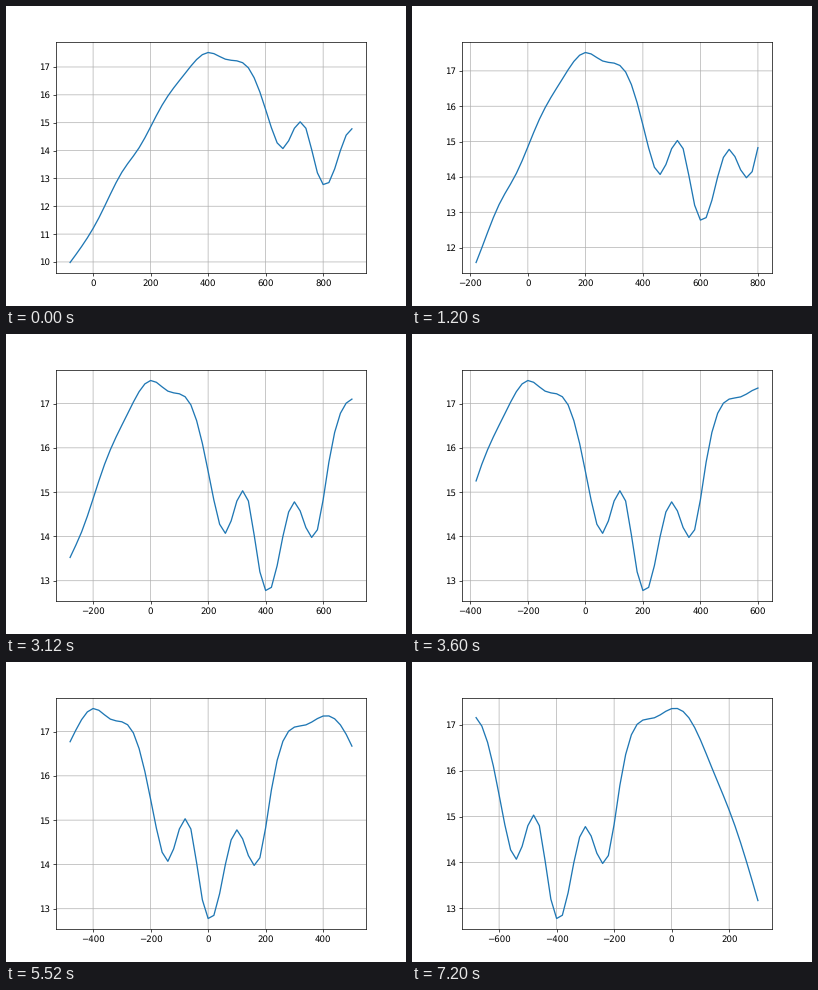
Write a matplotlib script that moves like this. It is 400 px wide and 300 px high and loops after 8 s.

```python
import matplotlib.pyplot as plt
import numpy as np
from matplotlib.animation import FuncAnimation

STEP = 20        # spacing of samples along x
WINDOW = 50      # samples visible at once
ADVANCE = 100    # distance the window moves along the curve per jump
SHIFT = 200      # distance the curve moves left per jump
INTERVAL = 400   # ms
HOLD = 3         # ticks each view stays
TICKS = 20

# Key points of the curve, joined by a smooth spline.
KNOTS = np.array([
    (-80, 9.98), (20, 11.58), (100, 13.22), (160, 14.1), (240, 15.63),
    (320, 16.77), (400, 17.52), (460, 17.28), (500, 17.22), (540, 16.97),
    (580, 16.1), (620, 14.82), (660, 14.07), (700, 14.8), (740, 14.8),
    (780, 13.2), (820, 12.85), (860, 14.0), (900, 14.78), (940, 14.2),
    (980, 14.15), (1020, 15.68), (1060, 16.78), (1100, 17.1), (1140, 17.15),
    (1200, 17.35), (1260, 17.15), (1340, 16.06), (1420, 14.8), (1500, 13.17),
])


def spline(x, y, at):
    """Natural cubic spline through the points (x, y)."""
    h = np.diff(x)
    slope = np.diff(y) / h
    system = (np.diag(np.r_[1, 2 * (h[:-1] + h[1:]), 1])
              + np.diag(np.r_[h[:-1], 0], -1)
              + np.diag(np.r_[0, h[1:]], 1))
    bend = np.linalg.solve(system, np.r_[0, 6 * np.diff(slope), 0])
    i = np.clip(np.searchsorted(x, at, side="right") - 1, 0, len(h) - 1)
    u = at - x[i]
    start = slope[i] - h[i] * (2 * bend[i] + bend[i + 1]) / 6
    twist = (bend[i + 1] - bend[i]) / (6 * h[i])
    return y[i] + u * (start + u * (bend[i] / 2 + u * twist))


plt.rcParams["text.hinting"] = "none"
fig, ax = plt.subplots(figsize=(6.4, 4.8), dpi=62.5)
line, = ax.plot([], [])
ax.grid(True, snap=False)


def update(tick):
    jump = tick // HOLD
    x = KNOTS[0, 0] + jump * ADVANCE + STEP * np.arange(WINDOW)
    line.set_data(x - jump * SHIFT, spline(*KNOTS.T, x))
    ax.relim()
    ax.autoscale_view()
    # Let tick marks sit between pixels, like the grid.
    plt.setp([*ax.get_xticklines(), *ax.get_yticklines()], snap=False)
    return line,


anim = FuncAnimation(fig, update, frames=TICKS, interval=INTERVAL,
                     repeat=True, repeat_delay=0)
plt.show()
```
